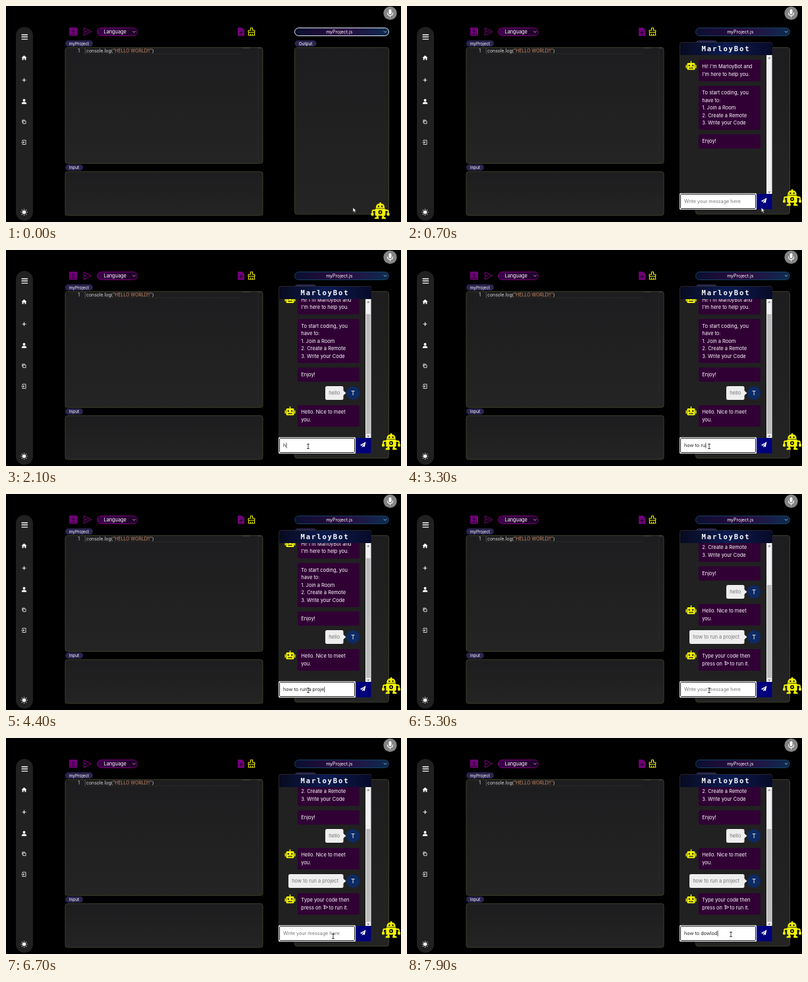
An HTML page for the animation above (8 s loop, 600 px wide and 330 px high).

```html
<!DOCTYPE html>
<html lang="en">
<head>
<meta charset="utf-8">
<title>Code editor with chat helper</title>
<style>
  html, body { margin: 0; width: 100%; height: 100%; overflow: hidden; background: #000; }
  svg { display: block; width: 600px; height: 330px; font-family: Inter, "Open Sans", sans-serif; }
  text { white-space: pre; }
  .tab { font-size: 6.4px; fill: #fff; }
  .code { font-size: 6.9px; fill: #ddd; }
  .chat { font-size: 7.5px; fill: #fff; }
  .field { font-size: 7.25px; }
  .title { font: bold 10.5px "DejaVu Sans Mono", monospace; letter-spacing: 1.9px; fill: #fff; }
</style>
</head>
<body>
<svg id="stage" viewBox="0 0 600 330" xmlns="http://www.w3.org/2000/svg"></svg>
<script>
const LOOP = 8000, STEP = 100;
const OPEN_AT = 500;
const LINE = 11.4;
const YELLOW = '#f4f400', PURPLE = '#800080', ICON = '#72007a';

// [time, x, y] of the pointer
const pointerPath = [
  [0, 527, 308], [350, 566, 311], [550, 566, 311], [1000, 459, 300],
  [5700, 459, 300], [6200, 497, 303], [6800, 497, 303], [7200, 492, 300], [8000, 492, 300]
];
const typing = [
  { text: 'hello', from: 1400, to: 1800, send: 1900 },
  { text: 'how to run a project', from: 2100, to: 4670, send: 4900 },
  { text: 'how to dowlod', from: 6900, to: 7860, send: Infinity }
];
// time from which each scroll offset and thumb top hold
const scrolls = [
  { at: 0, offset: 0, thumb: 0 },
  { at: 1900, offset: 16.5, thumb: 98 },
  { at: 4900, offset: 85.5, thumb: 139 }
];

const rect = (x, y, w, h, fill, r = 0, more = '') =>
  `<rect x="${x}" y="${y}" width="${w}" height="${h}" rx="${r}" fill="${fill}" ${more}/>`;
const path = (d, fill, more = '') => `<path d="${d}" fill="${fill}" ${more}/>`;
const line = (d, color, width = 1) =>
  path(d, 'none', `stroke="${color}" stroke-width="${width}" stroke-linecap="round" stroke-linejoin="round"`);
const circle = (x, y, r, fill, more = '') => `<circle cx="${x}" cy="${y}" r="${r}" fill="${fill}" ${more}/>`;
const text = (x, y, s, cls, more = '') => `<text x="${x}" y="${y}" class="${cls}" ${more}>${s}</text>`;
const at = (x, y, body, more = '') => `<g transform="translate(${x} ${y})" ${more}>${body}</g>`;
const gradient = (id, stops, dir = 'x2="1" y2="0"') =>
  `<linearGradient id="${id}" ${dir}>` +
  stops.map((c, i) => `<stop offset="${i / (stops.length - 1)}" stop-color="${c}"/>`).join('') +
  '</linearGradient>';
const tab = (x, y, w, s) => rect(x, y, w, 9.5, '#2a2550', 4.7) +
  text(x + w / 2, y + 7, s, 'tab', 'text-anchor="middle"');
const panel = (x, y, w, h) => rect(x, y, w, h, 'url(#panel)', 3.5, 'stroke="#3b4028" stroke-width="1"');
const chevron = (x, y) => line(`M${x - 1.8} ${y - .9}l1.8 1.8l1.8-1.8`, '#ddd', .8);

function sidebar() {
  const rays = [...Array(8).keys()].map(i =>
    `<path d="M0-3.8V-5" stroke="#fff" stroke-width="1.1" transform="rotate(${i * 45})"/>`).join('');
  return rect(15, 32, 26, 296, '#212121', 13) +
    line('M24 44h8.5M24 47.3h8.5M24 50.6h8.5', '#fff', 1.4) +
    path('M27.5 75.5l4 3.6h-1.1v3.3h-2v-2.2h-1.8v2.2h-2v-3.3h-1.1z', '#fff') +
    line('M27.5 110.7v5M25 113.2h5', '#fff', 1) +
    circle(27.5, 144, 2, '#fff') + path('M23.7 149.8q0-3.4 3.8-3.4t3.8 3.4z', '#fff') +
    line('M26.2 175.7h3.8v4h-3.8zM24.8 178v-3.8h3.6', '#fff', .8) +
    line('M25 206.5v-1.5h5v6.5h-5v-1.5M23.8 208.3h3.6M26.3 207.1l1.2 1.2l-1.2 1.2', '#fff', .8) +
    at(27.5, 315, circle(0, 0, 2.8, '#fff') + rays);
}

function toolbar() {
  return rect(96, 33, 12, 12.5, ICON, 1) +
    line('M102 35.5v4.5M100 38.3l2 2l2-2M98.3 43h7.4', '#15001a', 1) +
    line('M118.3 33.8L129.8 39.3L118.3 44.8V40.5L122 39.3L118.3 38.1Z', ICON, 1.1) +
    rect(138.5, 33.5, 61, 12, 'url(#lang)', 6, `stroke="${PURPLE}"`) +
    text(165.7, 42.1, 'Language', '', 'text-anchor="middle" font-size="7.35" fill="#fff"') +
    chevron(194.5, 39.5) +
    path('M352 33h6.2l3.8 3.8v9H352z', ICON) + line('M357 38v5M354.5 40.5h5', '#100014', 1.1) +
    line('M371.5 33.5h3v3.7h3.2v3h-9.6v-3h3.4zM368.8 40.2l-.6 4.6h9.6l-.6-4.6M371.5 44.5v-1.7M374.5 44.5v-1.7', YELLOW, 1.1) +
    rect(438.5, 33.5, 143, 12, 'url(#file)', 6, 'id="file-box"') +
    text(506.3, 42, 'myProject.js', '', 'text-anchor="middle" font-size="6.95" fill="#fff"') +
    chevron(576, 39.5) +
    circle(583.5, 11, 10.2, '#858585') + rect(581.5, 5, 4, 7.5, '#fff', 2) +
    line('M579.5 10.5q0 4 4 4t4-4M583.5 14.5v2.3', '#fff', 1.1);
}

function editor() {
  return panel(90, 63.5, 300, 177) + panel(90, 253, 300, 67) + panel(438.5, 63.5, 143, 254.5) +
    tab(90, 52.5, 42, 'myProject') + tab(90, 242, 27, 'Input') + tab(438.5, 52.5, 33, 'Output') +
    line('M120 73h237', '#303030', .7) + line('M382.3 65v173', '#2b2b2b', .7) +
    line('M360 64h10M383 64h5', '#555', .8) + line('M120.3 64.5v8', '#777', .6) +
    text(109.3, 70.8, '1', 'code') +
    text(122, 70.8, 'console.log(<tspan fill="#ce8a68">"HELLO WORLD!!"</tspan>)', 'code');
}

// Large helper robot, centred on its own origin
function robot() {
  const half =
    line('M-7.5-1H-10.5Q-12-1-12 1.5V4', YELLOW, 1.8) +
    rect(-14, 3, 4, 4.5, YELLOW, 1.5) +
    rect(-5.5, 7, 2.6, 3, YELLOW) + path('M-8.6 12.3q0-3 3-3h3.4v3z', YELLOW);
  return path('M-6.7-4.2Q-6.7-11.5 0-11.5T6.7-4.2z', YELLOW) + rect(-1, -13, 2, 2, YELLOW) +
    rect(-7.7, -3.4, 15.4, 10.8, YELLOW, 1) +
    circle(-2.6, -7, 1.2, '#111') + circle(2.6, -7, 1.2, '#111') +
    circle(0, 2, 3, '#111') + circle(0, 2, 1.2, YELLOW) +
    half + `<g transform="scale(-1 1)">${half}</g>`;
}

const face = y => at(431.5, y,
  rect(-6, -4, 12, 10.5, YELLOW, 1.5) + rect(-.7, -7, 1.4, 3.5, YELLOW) +
  rect(-8, -1, 1.4, 5, YELLOW, .6) + rect(6.6, -1, 1.4, 5, YELLOW, .6) +
  circle(-2.7, 0, 1.3, '#222') + circle(2.7, 0, 1.3, '#222') +
  rect(-3.3, 3.2, 6.6, 1.3, '#222'));

function botSays(y, lines, withFace = true) {
  const h = lines.length * LINE + 10.3;
  return rect(443, y, 94, h, '#300034', 2.5) +
    lines.map((s, i) => text(448.3, y + 13.4 + i * LINE, s, 'chat')).join('') +
    (withFace ? face(y + 9) : '');
}

function userSays(y, x, s) {
  return rect(x, y, 512.5 - x, 21, '#eee', 2.5) + path(`M512 ${y + 6.5}l4.5 4l-4.5 4z`, '#eee') +
    text(x + 5.2, y + 13.2, s, 'chat', 'style="fill:#777"') +
    circle(527, y + 10.5, 10.2, '#0d2a63') +
    text(527, y + 14, 'T', '', 'text-anchor="middle" font-size="9.5" fill="#fff"');
}

function chat() {
  const greeting = userSays(224.5, 485, 'hello') + botSays(253.5, ['Hello. Nice to meet', 'you.']);
  const answer = userSays(293.5, 429, 'how to run a project') +
    botSays(322.5, ['Type your code then', 'press on <tspan x="490.5">to run it.</tspan>']) +
    line('M483.3 341.3L488.8 344L483.3 346.8V344.7L485 344L483.3 343.3Z', '#fff', .8);
  const messages =
    botSays(82, ["Hi! I'm MarloyBot and", "I'm here to help you."]) +
    botSays(122, ['To start coding, you', 'have to:', '1. Join a Room', '2. Create a Remote', '3. Write your Code'], false) +
    botSays(196, ['Enjoy!'], false) +
    `<g id="greeting">${greeting}</g><g id="answer">${answer}</g>`;
  return rect(414.5, 55.5, 140.5, 255.5, '#212121', 3, 'stroke="#2c2c2c" stroke-width=".8"') +
    `<g clip-path="url(#body)"><g id="messages">${messages}</g></g>` +
    rect(546, 75, 8.5, 212, '#f1f1f1') +
    rect(547, 0, 6.5, 0, '#bdbdbd', 0, 'id="thumb"') +
    path('M548.3 80.5l2-2.5l2 2.5z', '#777') + path('M548.3 283.5l2 2.5l2-2.5z', '#777') +
    path('M415 75V59q0-3 3-3h134q3 0 3 3v16z', 'url(#head)') +
    text(447.5, 68.8, 'MarloyBot', 'title') +
    rect(530, 287, 24.5, 23.5, '#00007c') +
    path('M546.5 293l-8.7 5l2.3 1l5-4.5l-3.9 5v2.2l1.4-1.6l2.1.9z', '#fff') +
    rect(414, 286, 117, 25, '#fff', 1.5) +
    rect(415.5, 287.5, 114, 22, '#fff', 1, 'stroke="#111" stroke-width="1"') +
    text(421, 301, '', 'field', 'id="field"') + rect(0, 294.3, .7, 8.6, '#111', 0, 'id="caret"');
}

document.getElementById('stage').innerHTML =
  '<defs>' +
  gradient('panel', ['#1d1d1f', '#242424'], 'x2="0" y2="1"') +
  gradient('lang', ['#3a0048', '#1c0024']) +
  gradient('file', ['#0a1030', '#2b0a40', '#0b2d50']) +
  gradient('head', ['#080a20', '#0c1c50', '#080a28']) +
  '<clipPath id="body"><path d="M415 75h131v212h-131z"/></clipPath></defs>' +
  rect(0, 0, 600, 330, '#000') + sidebar() + toolbar() + editor() +
  `<g id="chat">${chat()}</g>` + at(585, 293, robot(), 'id="robot"') +
  at(0, 0,
    path('M0 0v6.8l1.6-1.5l1.2 2.7l1.2-.5l-1.2-2.7h2.2z', '#fff', 'id="arrow" stroke="#222" stroke-width=".5"') +
    `<g id="beam">${line('M-1.5-3.5h3M0-3.5v7M-1.5 3.5h3', '#111', .8)}</g>`, 'id="pointer"');

const el = id => document.getElementById(id);
const show = (id, on) => el(id).setAttribute('visibility', on ? 'inherit' : 'hidden');
const set = (id, name, value) => el(id).setAttribute(name, value);

function pointerAt(t) {
  const i = Math.max(1, pointerPath.findIndex(p => p[0] > t));
  const [t0, x0, y0] = pointerPath[i - 1], [t1, x1, y1] = pointerPath[i];
  const p = (t - t0) / (t1 - t0), e = p * p * (3 - 2 * p);
  return [x0 + (x1 - x0) * e, y0 + (y1 - y0) * e];
}

function typedAt(t) {
  const run = typing.find(r => t >= r.from && t < r.send);
  if (!run) return '';
  const n = 1 + Math.floor((t - run.from) / (run.to - run.from) * (run.text.length - 1) + 1e-6);
  return run.text.slice(0, n);
}

function draw(t) {
  const open = t >= OPEN_AT;
  show('chat', open);
  set('robot', 'transform', open ? 'translate(585 293)' : 'translate(568.5 313)');
  set('file-box', 'stroke', open ? '#174263' : '#e4ecf4');

  const scroll = scrolls.filter(s => t >= s.at).pop();
  set('messages', 'transform', `translate(0 ${-scroll.offset})`);
  set('thumb', 'y', scroll.thumb);
  set('thumb', 'height', scroll.thumb ? 281 - scroll.thumb : 0);
  show('greeting', t >= scrolls[1].at);
  show('answer', t >= scrolls[2].at);

  const typed = typedAt(t), field = el('field');
  field.textContent = typed || 'Write your message here';
  field.setAttribute('fill', typed ? '#222' : '#757575');
  show('caret', typed);
  if (typed) set('caret', 'x', 421.4 + field.getComputedTextLength());

  const [x, y] = pointerAt(t);
  const overField = open && x > 415 && x < 530 && y > 287 && y < 311;
  set('pointer', 'transform', `translate(${x} ${y})`);
  show('arrow', !overField);
  show('beam', overField);
}

const start = performance.now();
function tick() {
  const t = (performance.now() - start) % LOOP;
  draw(Math.floor(t / STEP) * STEP);
  requestAnimationFrame(tick);
}
tick();
</script>
</body>
</html>
```
